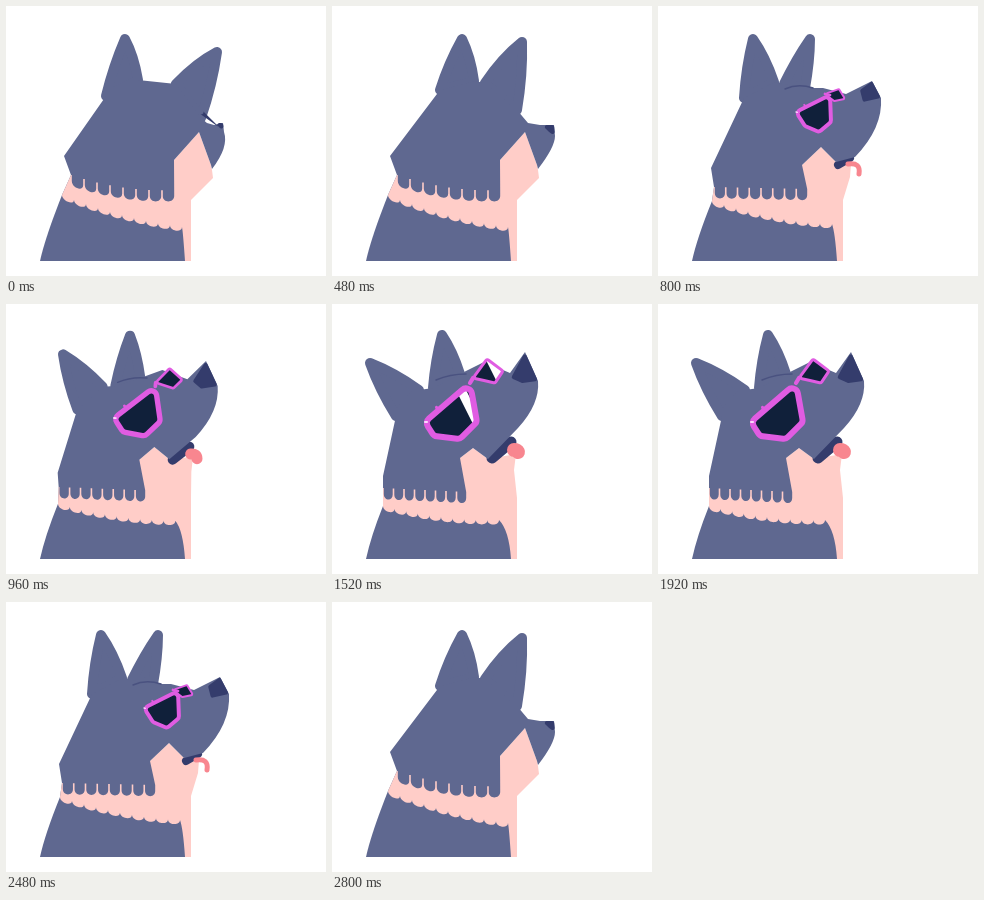
Write an HTML page with a canvas that moves like this. It is 320 by 270 pixels and loops after 2880 ms.

```html
<!DOCTYPE html>
<html lang="en">
<head>
<meta charset="utf-8">
<title>Cool dog</title>
<style>
html, body { margin: 0; width: 100%; height: 100%; overflow: hidden; background: #fff; }
canvas { display: block; width: 320px; height: 270px; }
</style>
</head>
<body>
<canvas id="stage" width="320" height="270"></canvas>
<script>
const ctx = document.getElementById('stage').getContext('2d');
const STEP = 80, STEPS = 36;
const BLUE = '#5f6890', PINK = '#ffcdc8', NAVY = '#10203a', INK = '#343c6c',
      MAGENTA = '#e05ce2', TONGUE = '#f8868f', CREASE = '#4a5280';
const POSES = [0, 1, 5, 8];   // away, starting to turn, in profile, looking up
let pose = 0;

const clamp = (v, lo, hi) => Math.max(lo, Math.min(hi, v));
const mix = (a, b, u) => a.map((v, i) => v + (b[i] - v) * u);

// A landmark on the dog, given at the last three or all four poses.
function mark(...keys) {
  const times = POSES.slice(-keys.length);
  const i = Math.max(0, times.findLastIndex((t, n) => t <= pose && n < keys.length - 1));
  return mix(keys[i], keys[i + 1], clamp((pose - times[i]) / (times[i + 1] - times[i]), 0, 1));
}

// The nose tip swings outwards midway through the turn.
function swing([x, y]) {
  return [x + 5 * Math.sin(Math.PI * clamp((pose - 1) / 4, 0, 1)), y];
}

function polygon(points, radius = 0) {
  const n = points.length;
  ctx.beginPath();
  ctx.moveTo(...mix(points[0], points[n - 1], 0.5));
  points.forEach((p, i) => ctx.arcTo(...p, ...mix(p, points[(i + 1) % n], 0.5), radius));
  ctx.closePath();
}

function fill(color) {
  ctx.fillStyle = color;
  ctx.fill();
}

function stroke(color, width) {
  ctx.strokeStyle = color;
  ctx.lineWidth = width;
  ctx.stroke();
}

function curve(a, control, b, color, width) {
  ctx.beginPath();
  ctx.moveTo(...a);
  ctx.quadraticCurveTo(...control, ...b);
  stroke(color, width);
}

function ear(outer, tip, inner) {
  const bulge = (a, b) => mix(b, mix(a, tip, 0.5), 1.1);
  ctx.beginPath();
  ctx.moveTo(...outer);
  ctx.quadraticCurveTo(...bulge(outer, inner), ...tip);
  ctx.quadraticCurveTo(...bulge(inner, outer), ...inner);
  ctx.closePath();
  fill(BLUE);
  stroke(BLUE, 10);
}

// Adds rounded tufts with straight sides, hanging from a sagging line.
function tufts(a, b, count, side, depth, sag, gap) {
  for (let i = 0; i < count; i++) {
    const [[x, y], [nx, ny]] = [i, i + 1].map(n => {
      const u = n / count, [px, py] = mix(a, b, u);
      return [px, py + 4 * sag * u * (1 - u)];
    });
    const g = Math.sign(b[0] - a[0]) * gap;
    ctx.lineTo(x + g, y);
    ctx.lineTo(x + g, y + side);
    ctx.bezierCurveTo(x + g, y + side + depth, nx - g, ny + side + depth, nx - g, ny + side);
    ctx.lineTo(nx - g, ny);
  }
}

function lens(points, radius, width, glintX) {
  polygon(points, radius);
  fill(NAVY);
  if (glintX) {
    ctx.save();
    ctx.clip();
    curve([glintX, 50], [glintX + 25, 100], [glintX + 50, 150], '#fff', 9);
    ctx.restore();
  }
  polygon(points, radius);
  stroke(MAGENTA, width);
}

function drawGlasses(step) {
  const hidden = [199, 112];
  const from = (profile, up) => mark(hidden, profile, up);
  const near = [from([138, 106], [93, 118]), from([172, 89], [138, 79]), from([173, 116], [145, 118]),
                from([161, 126], [128, 135]), from([147, 120], [102, 132])];
  const far = [from([167, 88], [141, 74]), from([181, 83], [155, 55]),
               from([187, 93], [171, 67]), from([176, 95], [163, 79])];
  const [size] = mark([1], [4], [6]);
  const shine = step - 19;
  const shining = shine >= 0 && shine < 5;

  curve(mark([160, 104], [127, 83], [104, 76]), mark([166, 101], [140, 77], [118, 70]),
        mark([174, 104], [155, 82], [134, 70]), CREASE, 1.5);
  lens(far, size / 3, size / 2, shining && 156 - 7 * shine);
  lens(near, size, size, shining && 111 - 10 * shine);
  curve(near[1], near[1], far[0], MAGENTA, size * 0.7);
  const temple = mix(near[0], near[1], 0.3);
  curve(temple, temple, [temple[0] - 2, temple[1] - size / 2], MAGENTA, size / 2);
  curve(near[0], near[0], mix(near[0], near[2], 0.04), '#fbd8fb', size / 3);
}

function draw(step) {
  pose = clamp(Math.min(step - 5, STEPS - step), 0, 8);
  ctx.fillStyle = '#fff';
  ctx.fillRect(0, 0, 320, 270);
  ctx.lineJoin = ctx.lineCap = 'round';

  const earL = [mark([100, 90], [108, 84], [86, 92], [64, 112]),
                mark([119, 33], [130, 33], [95, 33], [38, 59]),
                mark([132, 74], [142, 75], [116, 76], [87, 86])];
  const earR = [mark([195, 112], [185, 104], [147, 82], [128, 70]),
                mark([211, 46], [190, 36], [152, 33], [110, 31]),
                mark([170, 78], [153, 77], [126, 78], [101, 84])];
  const brow = mark([201, 117], [196, 117], [165, 82], [152, 58]);
  const bridge = mark([208, 119], [188, 88], [178, 69]);
  const noseTip = swing(mark([217, 117], [222, 119], [214, 75], [193, 48]));
  const noseFront = swing(mark([218, 126], [223, 130], [223, 92], [206, 77]));
  const snout = mark([223, 141], [225, 122], [208, 100]);
  const chin = mark([206, 163], [197, 151], [186, 124]);
  const mouth = mark([205, 159], [178, 156], [156, 155]);
  const cheek = mark([193, 126], [163, 141], [141, 144]);
  const cheekBack = mark([168, 154], [144, 159], [128, 154]);
  const ruffL = mark([65, 169], [56, 181], [51, 184]);
  const ruffR = mark([169, 184], [150, 183], [135, 188]);
  const jowl = mark([58, 150], [53, 162], [51, 172]);
  const bibL = mark([56, 189], [54, 195], [51, 202]);
  const bibR = mark([176, 221], [174, 218], [167, 216]);

  // Body, then the pink bib with its tufted lower edge.
  ctx.beginPath();
  ctx.moveTo(...ruffL);
  ctx.lineTo(...bibL);
  ctx.quadraticCurveTo(39, 232, 34, 255);
  ctx.lineTo(181, 255);
  ctx.lineTo(176, 190);
  fill(BLUE);
  ctx.beginPath();
  ctx.moveTo(...ruffL);
  tufts(bibL, bibR, 10, 0, 6, 4, 0);
  ctx.quadraticCurveTo(177, 226, 179, 255);
  const throat = mark([207, 172], [192, 171], [182, 166]);
  const collarbone = [185, 194], jawline = mark([206, 164], [193, 158], [184, 150]);
  for (const p of [[185, 255], collarbone, throat, jawline, mouth, cheek, cheekBack]) ctx.lineTo(...p);
  fill(PINK);

  // Open jaw and tongue grow out from behind the muzzle.
  const inside = [204, 146];
  const jawTip = mark(inside, [192, 152], [179, 138]);
  curve(mark(inside, [180, 159], [160, 154]), jawTip, jawTip, INK, mark([2], [8], [11])[0]);
  curve(mark(inside, [190, 158], [182, 146]), mark(inside, [203, 156], [185, 146]),
        mark(inside, [201, 168], [186, 148]), TONGUE, mark([1], [5], [14])[0]);

  ear(...earL);
  ear(...earR);
  ctx.beginPath();
  ctx.moveTo(...ruffL);
  for (const p of [jowl, earL[0], earL[2], earR[2], earR[0], brow, bridge, noseTip, noseFront]) ctx.lineTo(...p);
  ctx.quadraticCurveTo(...snout, ...chin);
  for (const p of [mouth, cheek, cheekBack]) ctx.lineTo(...p);
  tufts(ruffR, ruffL, 8, 6, 7, mark([5], [0], [0])[0], 0.8);
  fill(BLUE);

  polygon([swing(mark([207, 117], [210, 119], [202, 84], [179, 74])), noseTip, noseFront,
           swing(mark([214, 122], [217, 126], [205, 96], [190, 79]))], 2);
  fill(INK);

  if (pose >= 2) drawGlasses(step);
}

function frame() {
  draw(Math.floor(performance.now() / STEP) % STEPS);
  requestAnimationFrame(frame);
}
frame();
</script>
</body>
</html>
```
